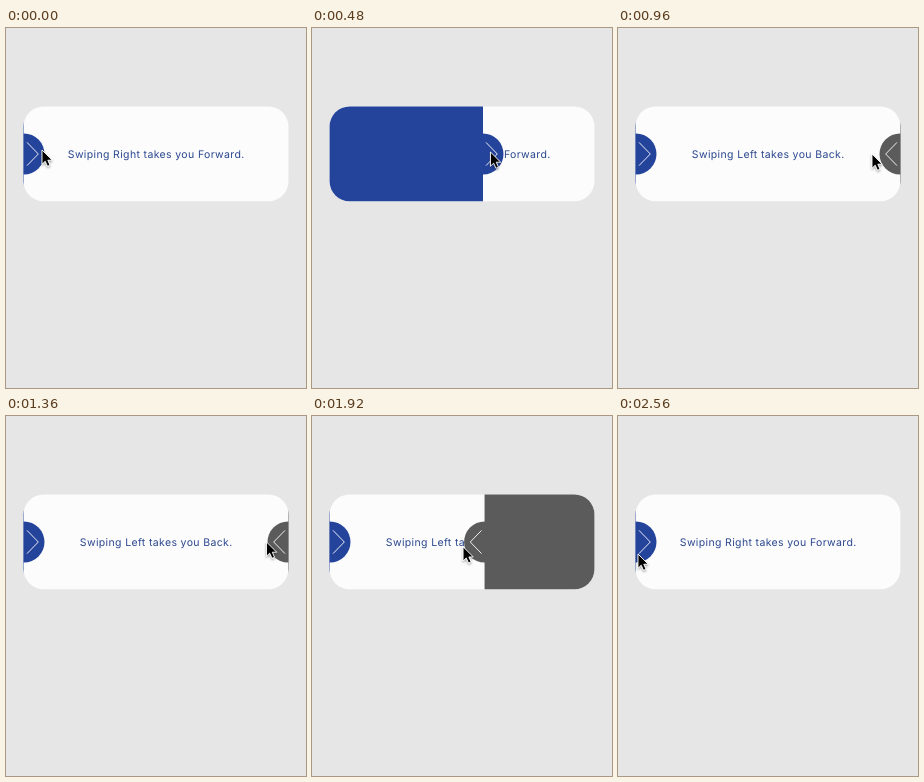
These frames come from a looping animation (300 px wide and 360 px high, 2800 ms). An HTML page:

```html
<!DOCTYPE html>
<html lang="en">
<head>
<meta charset="utf-8">
<style>
  html, body { margin: 0; height: 100%; overflow: hidden; background: #e6e6e6; }
  svg { display: block; width: 100vw; height: 100vh; }
  text {
    font: 10.5px Inter, "Liberation Sans", sans-serif; letter-spacing: .36px;
    text-anchor: middle; text-rendering: geometricPrecision; fill: #2b478f;
  }
  .blue { fill: #24439b; }
  .gray { fill: #5b5b5b; }
  .chevron { fill: none; stroke: #fff; stroke-width: .9; }
</style>
</head>
<body>
<svg viewBox="0 0 300 360">
  <defs>
    <clipPath id="card"><rect x="17.6" y="78.5" width="264.8" height="94.8" rx="20"/></clipPath>
    <filter id="shadow" x="-50%" y="-50%" width="200%" height="200%">
      <feDropShadow dx="0" dy="1.2" stdDeviation="1" flood-opacity=".4"/>
    </filter>
  </defs>
  <g clip-path="url(#card)">
    <rect x="17" y="78" width="266" height="96" fill="#fcfcfc"/>
    <text id="label" x="150.2" y="130.4"></text>
    <g id="back">
      <rect class="gray" y="78" width="266" height="96"/>
      <circle class="gray" cy="126" r="20.5"/>
      <path class="chevron" d="M-3 114.4L-14.3 126L-3 137.6"/>
    </g>
    <g id="forward">
      <rect class="blue" x="-266" y="78" width="266" height="96"/>
      <circle class="blue" cy="126" r="20.5"/>
      <path class="chevron" d="M3 114.4L14.3 126L3 137.6"/>
    </g>
  </g>
  <path id="cursor" d="M0 0V14.2L3.2 11.2L5.5 16.3L8 15.2L5.8 10.2H10.2Z"
        fill="#000" stroke="#fff" stroke-width=".9" filter="url(#shadow)"/>
</svg>
<script>
const LOOP = 2800, STEP = 80, LAST = 2560;
const TO_SECOND = 880, TO_FIRST = 2480;
const LEFT = 18, RIGHT = 282, GRIP = 21.5;

const ramp = (t, from, to) => Math.min(1, Math.max(0, (t - from) / (to - from)));
const ease = (t, from, to) => {
  const p = ramp(t, from, to);
  return p * p * (3 - 2 * p);
};

// The forward panel is dragged, then runs on to the far side when released.
const forwardEdge = t => LEFT + 212 * ease(t, 142, 660) + 52 * ramp(t, 640, 800);
const backEdge = t => RIGHT - (RIGHT - LEFT) * ease(t, 1537, 2402);

function cursorX(t) {
  if (t < TO_SECOND) return 36 + 200 * ease(t, 152, 660) + 18 * ease(t, 640, 960);
  const approach = 254 + (RIGHT - GRIP - 254) * ease(t, 960, 1280);
  return Math.max(20, Math.min(approach, backEdge(t) - GRIP));
}
const cursorY = t => 122 + 4 * ease(t, 320, 640) + 12 * ease(t, 1680, 2240);

const el = id => document.getElementById(id);
const move = (id, x, y = 0) => el(id).setAttribute("transform", `translate(${x} ${y})`);

function draw(now) {
  const t = Math.min(LAST, Math.floor(now % LOOP / STEP) * STEP);
  const second = t >= TO_SECOND && t < TO_FIRST;
  el("label").textContent = second ? "Swiping Left takes you Back." : "Swiping Right takes you Forward.";
  el("back").style.display = second ? "" : "none";
  move("forward", t < TO_SECOND ? forwardEdge(t) : LEFT);
  move("back", backEdge(t));
  move("cursor", cursorX(t), cursorY(t));
}

const start = performance.now();
function tick() {
  draw(performance.now() - start);
  requestAnimationFrame(tick);
}
tick();
</script>
</body>
</html>
```
